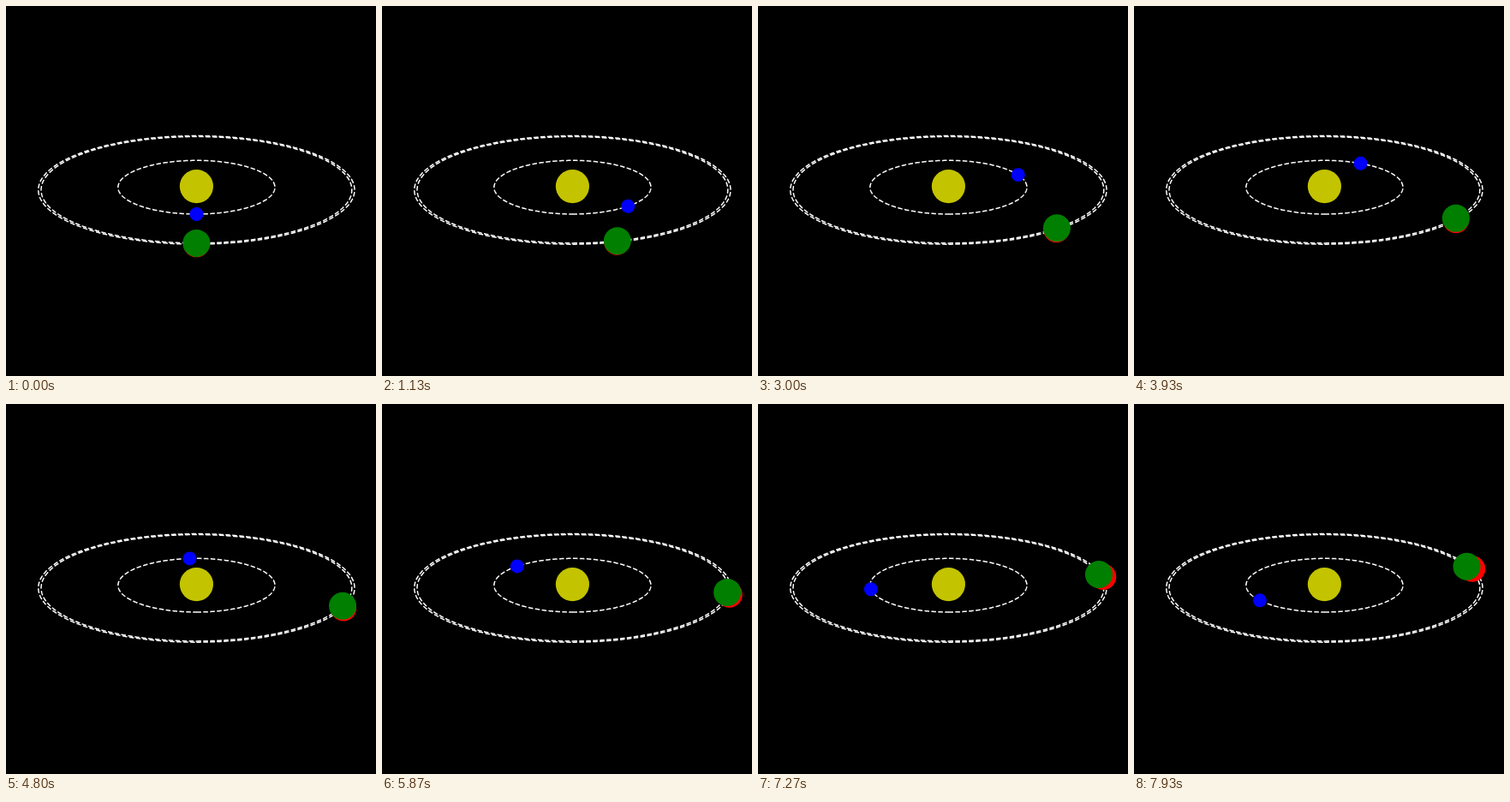
Animation of 432 by 432 pixels, one loop 8 s. Source, as an HTML page with a canvas:

```html
<!DOCTYPE html>
<html lang="en">
<head>
<meta charset="utf-8">
<title>Orbits</title>
<style>
  html, body { margin: 0; height: 100%; overflow: hidden; background: #000; }
  canvas { display: block; }
</style>
</head>
<body>
<canvas id="stage" width="432" height="432"></canvas>
<script>
const ctx = document.getElementById('stage').getContext('2d');
const LOOP = 8000, FRAMES = 120;
const SUN = { x: 222.4, y: 210.6, size: 19.6, color: '#c3c300' };

// Orbit radius in px, speed in degrees per step, in drawing order.
const planets = [
  { orbit: 91.5, speed: 360 / 140, size: 8, color: '#00f' },
  { orbit: 184.2, speed: 0.9, size: 15.2, color: '#f00' },
  { orbit: 181, speed: 0.9257, size: 16, color: '#007f00' }
];

// Perspective view of a tilted circle; angle 0 is nearest the viewer.
function project(radius, angle) {
  const depth = 1 - radius * 0.000365 * Math.cos(angle);
  return {
    x: SUN.x + radius * Math.sin(angle) / depth,
    y: SUN.y + radius * 0.342 * Math.cos(angle) / depth
  };
}

function makeRing(radius) {
  const path = new Path2D();
  for (let i = 0; i <= 360; i++) {
    const p = project(radius, i * Math.PI / 180);
    path.lineTo(p.x, p.y);
  }
  return path;
}

function disc({ x, y }, size, color) {
  ctx.fillStyle = color;
  ctx.beginPath();
  ctx.arc(x, y, size, 0, 2 * Math.PI);
  ctx.fill();
}

const rings = planets.map(p => makeRing(p.orbit));

function draw(step) {
  ctx.fillStyle = '#000';
  ctx.fillRect(0, 0, 432, 432);
  ctx.strokeStyle = '#fff';
  ctx.lineWidth = 1.5;
  ctx.setLineDash([5.55, 2.4]);
  rings.forEach(ring => ctx.stroke(ring));
  disc(SUN, SUN.size, SUN.color);
  for (const p of planets) {
    disc(project(p.orbit, step * p.speed * Math.PI / 180), p.size, p.color);
  }
}

function tick() {
  // Steps fall on whole hundredths of a second.
  const time = Math.floor(performance.now() % LOOP / 10) * 10;
  draw(Math.floor((time + 3.4) * FRAMES / LOOP) % FRAMES);
  requestAnimationFrame(tick);
}
tick();
</script>
</body>
</html>
```
